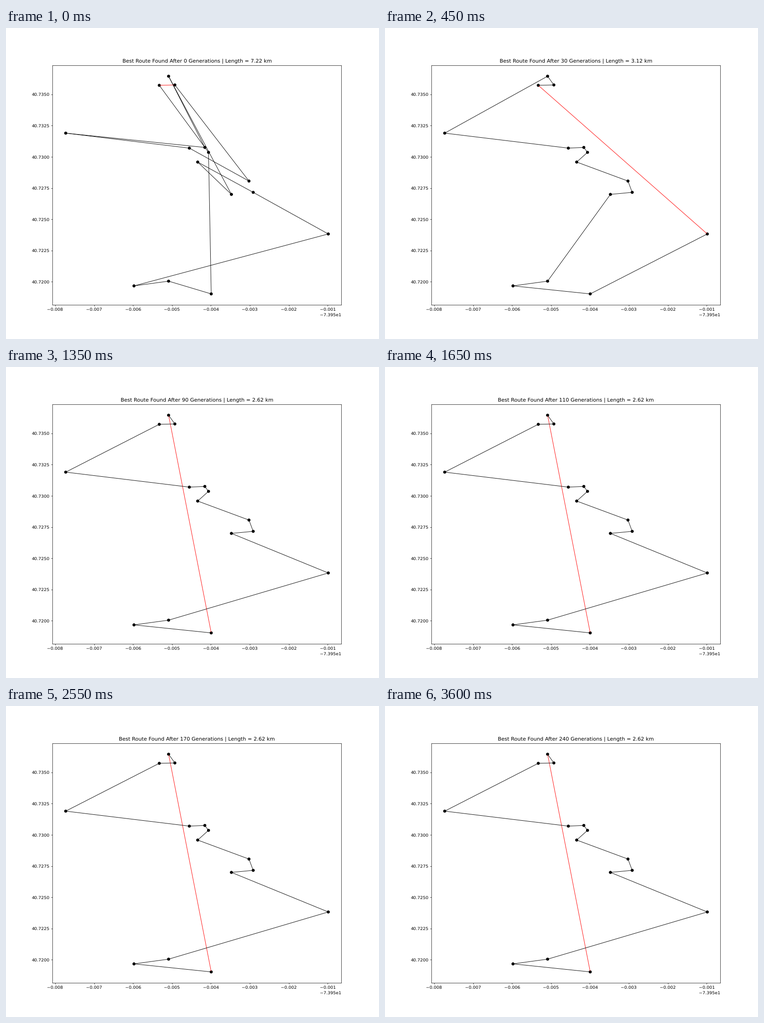
A matplotlib script for the animation above (3750 ms loop, 820x683 px).

```python
import matplotlib.pyplot as plt
from matplotlib.animation import FuncAnimation

plt.rcParams.update({
    "font.family": "DejaVu Sans",
    "text.hinting": "none",
    "toolbar": "None",
})

W, H = 820, 683
DPI = W / 12
FRAMES, STEP_MS, GENS_PER_STEP = 25, 150, 10

# Stops in stage pixels, keyed by letter
STOPS = {
    "A": (337, 126), "B": (357.5, 106), "C": (371.3, 125.2),
    "D": (131.2, 231), "E": (403.2, 263.9), "F": (437.2, 262.4),
    "G": (445.3, 273.2), "H": (421.5, 294.5), "I": (534.3, 336.2),
    "J": (543.6, 361), "K": (495.7, 365.5), "L": (708.8, 452.4),
    "M": (357.5, 556), "N": (281.4, 566.4), "O": (451.3, 584),
}

# First step, route length in km, visiting order
STAGES = [
    (0, 7.22, "CIEDFBKHJLNMOGA"),
    (1, 4.09, "CABDEFHIGJKNMLO"),
    (2, 3.76, "CBADFEGHJIKMLON"),
    (3, 3.12, "ACBDEFGHIJKMNOL"),
    (4, 2.69, "BCADEFGHIJKLMON"),
    (5, 2.67, "BCADEFGHIJKLONM"),
    (7, 2.62, "BCADEFGHIJKLMNO"),
]


def to_degrees(x, y):
    lon = -73.958 + (x - 108) * 0.007 / 599.5
    lat = 40.735 - (y - 146) * 0.015 / 411.5
    return lon, lat


POINTS = {name: to_degrees(*xy) for name, xy in STOPS.items()}

fig, ax = plt.subplots(figsize=(12.00001, (H + 0.001) / DPI), dpi=DPI)
fig.subplots_adjust(left=102.4 / W, right=737.4 / W)


def link(a, b, color):
    ax.annotate("", xy=POINTS[b], xytext=POINTS[a],
                arrowprops=dict(arrowstyle="-", connectionstyle="arc3",
                                color=color, lw=1))


def draw(step):
    length, route = [s[1:] for s in STAGES if s[0] <= step][-1]
    ax.cla()
    # one colour per dot keeps the dots off the whole-pixel grid
    ax.scatter(*zip(*POINTS.values()), s=36, lw=1, zorder=2,
               c=["black"] * len(POINTS))
    link(route[-1], route[0], "red")
    for a, b in zip(route, route[1:]):
        link(a, b, "black")
    ax.set_title(f"Best Route Found After {step * GENS_PER_STEP} Generations"
                 f" | Length = {length:.2f} km")
    return []


anim = FuncAnimation(fig, draw, frames=FRAMES, interval=STEP_MS,
                     init_func=lambda: draw(0), repeat=True, repeat_delay=0)
plt.show()
```
